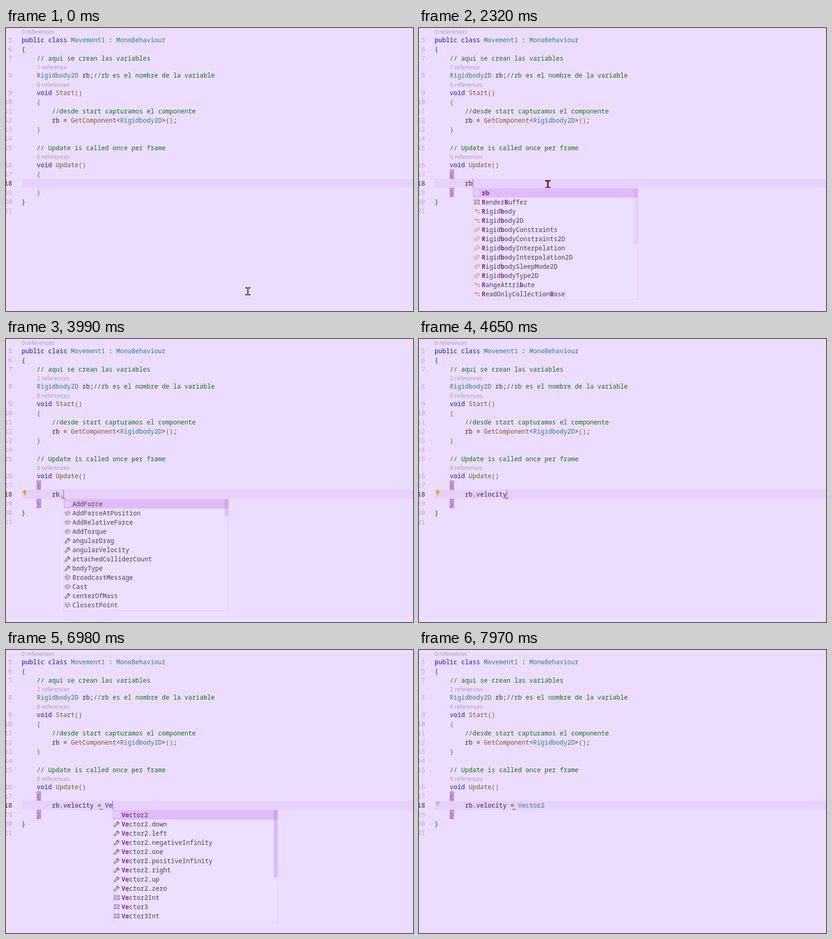
An HTML page with a canvas that plays this animation: 886x616 px, repeating every 8 s.

```html
<!DOCTYPE html>
<html lang="es">
<head>
<meta charset="utf-8">
<title>Code editor</title>
<style>
html, body { margin: 0; width: 100%; height: 100%; overflow: hidden; background: #ecddff; }
canvas { display: block; }
</style>
</head>
<body>
<canvas id="stage" width="886" height="616"></canvas>
<script>
const ctx = document.getElementById('stage').getContext('2d');
const LOOP = 8000, LEFT = 34, CHAR = 8.247;
const MONO = '13.745px "Noto Sans Mono", "DejaVu Sans Mono", monospace';
const LENS = '12.3px "Open Sans", "Noto Sans", sans-serif';
const GRAY = '#6a5a78', TAN = '#d49a66', WHITE = '#f8f0ff', PURPLE = '#8a4fb0';

// [line number, top, text]
const LINES = [
  [5, 16, 'public class Movement1 : MonoBehaviour'],
  [6, 36, '{'],
  [7, 56, '    // aqui se crean las variables'],
  [8, 93, '    Rigidbody2D rb;//rb es el nombre de la variable'],
  [9, 131, '    void Start()'],
  [10, 151, '    {'],
  [11, 171, '        //desde start capturamos el componente'],
  [12, 191, '        rb = GetComponent<Rigidbody2D>();'],
  [13, 211, '    }'],
  [14, 231, ''],
  [15, 251, '    // Update is called once per frame'],
  [16, 288, '    void Update()'],
  [17, 308, '    {'],
  [18, 328, ''],
  [19, 348, '    }'],
  [20, 368, '}'],
  [21, 388, '']
];

// Suggestion lists: the leading letter names the icon.
const VECTORS = ('s:Vector2 p:Vector2.down p:Vector2.left p:Vector2.negativeInfinity p:Vector2.one ' +
  'p:Vector2.positiveInfinity p:Vector2.right p:Vector2.up p:Vector2.zero s:Vector2Int s:Vector3 s:Vector3Int').split(' ');
const POPUPS = {
  rb: { match: /(^r|b)/i, bar: 121, alpha: .11, items: ('f:rb s:RenderBuffer c:Rigidbody c:Rigidbody2D ' +
    'e:RigidbodyConstraints e:RigidbodyConstraints2D e:RigidbodyInterpolation e:RigidbodyInterpolation2D ' +
    'e:RigidbodySleepMode2D e:RigidbodyType2D c:RangeAttribute c:ReadOnlyCollectionBase').split(' ') },
  members: { match: /(^$)/, bar: 36, alpha: .2, items: ('m:AddForce m:AddForceAtPosition m:AddRelativeForce ' +
    'm:AddTorque p:angularDrag p:angularVelocity p:attachedColliderCount p:bodyType m:BroadcastMessage ' +
    'm:Cast p:centerOfMass m:ClosestPoint').split(' ') },
  velocity: { match: /(^ve|Ve)/, bar: 0, alpha: 0, items: ('p:velocity p:angularVelocity m:GetPointVelocity ' +
    'm:GetRelativePointVelocity m:GetRelativeVector m:GetVector').split(' ') },
  ve: { match: /(^Ve)/, bar: 146, alpha: .25, items: VECTORS },
  vec: { match: /(^Vec)/, bar: 146, alpha: .25, items: VECTORS }
};

// [time, typed text, caret column, squiggle centre column, suggestion list]; -1 hides
const STEPS = [
  [0, '', -1, -1],
  [990, '', 0, -1],
  [1320, '', -1, -1],
  [1650, '', 8, -1],
  [1980, '', -1, -1],
  [2320, 'rb', 10, -1, 'rb'],
  [2980, 'rb', -1, -1, 'rb'],
  [3330, 'rb', 10, 10, 'rb'],
  [3990, 'rb.', 11, 11, 'members'],
  [4320, 'rb.ve', 13, 13, 'velocity'],
  [4650, 'rb.velocity', 19, 19],
  [5320, 'rb.velocity ', 20, 20],
  [5650, 'rb.velocity = ', 22, 22],
  [6320, 'rb.velocity = ', -1, 22],
  [6650, 'rb.velocity = ', 22, 21],
  [6980, 'rb.velocity = Ve', 24, 21, 've'],
  [7310, 'rb.velocity = Vec', 25, 21, 'vec'],
  [7640, 'rb.velocity = Vector2', 29, 21],
  [7970, 'rb.velocity = Vector2', -1, 21]
];

// [time, x, y] of the pointer's centre
const POINTER = [[0, 526, 573], [330, 328, 353], [660, 280, 340]];

const latest = (list, t) => list.filter(s => s[0] <= t).pop();
const colX = col => LEFT + col * CHAR;
const caretX = col => Math.round(colX(col) + .3);

function rect(x, y, w, h, color) {
  ctx.fillStyle = color;
  ctx.fillRect(x, y, w, h);
}

function frame(x, y, w, h, color) {
  ctx.strokeStyle = color;
  ctx.lineWidth = 1;
  ctx.strokeRect(x + .5, y + .5, w - 1, h - 1);
}

function path(points, color, width = 1) {
  ctx.strokeStyle = color;
  ctx.lineWidth = width;
  ctx.beginPath();
  points.forEach(([x, y]) => ctx.lineTo(x, y));
  ctx.stroke();
}

function disc(x, y, r, color) {
  ctx.fillStyle = color;
  ctx.beginPath();
  ctx.arc(x, y, r, 0, 7);
  ctx.fill();
}

// Places every character on the column grid.
function mono(text, x, y, color, bold) {
  ctx.font = (bold ? 'bold ' : '') + MONO;
  ctx.fillStyle = color;
  [...text].forEach((c, i) => c !== ' ' && ctx.fillText(c, x + i * CHAR, y));
}

function tokenColor(word, col, t) {
  if (word.startsWith('//')) return '#0c7712';
  if (/^(public|class|void)$/.test(word)) return '#0a14e6';
  if (/^(Movement1|MonoBehaviour|Rigidbody2D)$/.test(word)) return '#267f99';
  if (word === 'Vector2' && t >= 7970) return '#267f99';
  if (/^(Start|Update|GetComponent)$/.test(word)) return '#795e26';
  if (/[{}]/.test(word)) return col ? '#69713c' : '#0431fa';
  if (/[()]/.test(word)) return '#6b6639';
  return /\w/.test(word) ? '#35206f' : '#30254a';
}

function code(text, top, t) {
  for (const m of text.matchAll(/\/\/.*|\w+|\S/g))
    mono(m[0], colX(m.index), top + 15, tokenColor(m[0], m.index, t));
}

function lens(text, x, y) {
  ctx.font = LENS;
  ctx.fillStyle = '#a795b7';
  ctx.fillText(text, x, y);
}

function cube(x, y, color) {
  path([[x - 5, y - 2], [x + 1, y - 5], [x + 5, y - 2], [x + 5, y + 2], [x - 1, y + 5], [x - 5, y + 2], [x - 5, y - 2], [x - 1, y], [x + 5, y - 2]], color);
  path([[x - 1, y], [x - 1, y + 5]], color);
}

// Each icon has its usual colour and a shape.
const ICONS = {
  f: [PURPLE, cube],
  m: [PURPLE, cube],
  s: [GRAY, (x, y, color) => {
    frame(x - 6, y - 5, 12, 4, color);
    frame(x - 6, y + 1, 5, 4, color);
    frame(x + 1, y + 1, 5, 4, color);
  }],
  c: [TAN, (x, y, color) => {
    path([[x - 5, y - 2], [x - 2, y - 5], [x, y - 3], [x - 3, y], [x - 5, y - 2]], color, 1.3);
    path([[x - 1, y - 1.5], [x + 4, y - 1.5]], color);
    path([[x + .5, y - 1], [x + .5, y + 3.5], [x + 4, y + 3.5]], color);
    frame(x + 3, y - 3, 3, 3, color);
    frame(x + 3, y + 2, 3, 3, color);
  }],
  e: [TAN, (x, y, color) => {
    path([[x - .5, y - 1], [x - .5, y - 4.5], [x + 5.5, y - 4.5], [x + 5.5, y + .5], [x + 2, y + .5]], color, 1.2);
    frame(x - 6, y - 1, 7, 6, color);
    path([[x + 1, y - 2.5], [x + 4, y - 2.5]], color);
    path([[x - 4, y + 1.5], [x - 1, y + 1.5]], color);
  }],
  p: [GRAY, (x, y, color) => {
    path([[x + 4, y - 5], [x + 1, y - 5], [x - 1, y - 3], [x - 1, y - 1], [x - 6, y + 4], [x - 4, y + 6], [x + 1, y + 1], [x + 3, y + 1], [x + 5, y - 1], [x + 5, y - 3], [x + 3, y - 1.5], [x + 1, y - 3], [x + 4, y - 5]], color, 1.1);
  }]
};

function popup({ match, bar, alpha, items }, left) {
  const top = 349, height = items.length * 20;
  rect(left, top - 1, 360, height + 3, '#ecdfff');
  rect(left + 1, top, 358, 20, '#e0bbf9');
  frame(left, top - 1, 360, height + 4, '#e2cbf5');
  items.forEach((item, i) => {
    const y = top + 20 * i;
    const [color, shape] = ICONS[item[0]];
    let x = left + 19.5;
    shape(left + 9, y + 10, i ? color : WHITE);
    item.slice(2).split(match).forEach((part, k) => {
      mono(part, x, y + 15, k % 2 ? '#8020be' : '#4d3d60', k % 2);
      x += part.length * CHAR;
    });
  });
  rect(left + 351, top, 8, bar, `rgba(170, 80, 225, ${alpha})`);
}

function bulb(color) {
  disc(40.7, 332.8, 3.8, color);
  rect(39, 336, 3.5, 4, color);
}

function pointer(x, y, clicked) {
  const edge = clicked ? '#16091a' : '#174a1b';
  const fill = clicked ? '#dd1c9c' : '#8fc08e';
  const stem = clicked ? '#dd1c9c' : '#c98a96';
  for (const side of [x - 5, x + 1]) {
    rect(side, y - 9, 5, 3, edge);
    rect(side, y + 6, 5, 3, edge);
  }
  rect(x - 1, y - 8, 3, 16, edge);
  rect(x - 4, y - 8, 9, 1, fill);
  rect(x - 4, y + 7, 9, 1, fill);
  rect(x, y - 7, 1, 14, stem);
}

function draw(t) {
  const [, typed, caret, squiggle, list] = latest(STEPS, t);
  rect(0, 0, 886, 616, '#ecddff');
  rect(LEFT, 328, 852, 20, '#e6d1fa');

  if (t >= 990) for (const y of [308, 348]) {
    rect(67, y, 9, 20, '#cf9cf0');
    frame(67, y, 9, 20, '#b263dd');
  }

  lens('0 references', 34, 13);
  lens(t < 2980 ? '1 reference' : '2 references', 67.5, 90);
  lens('0 references', 67.5, 128);
  lens('0 references', 67.5, 285);
  for (const [n, top, text] of LINES) {
    const label = String(n);
    mono(label, 13.3 - label.length * CHAR, top + 15, n === 18 ? '#251c46' : '#bda6cc');
    code(text, top, t);
  }
  code(' '.repeat(8) + typed, 328, t);

  if (t >= 2650 && t < 5650) bulb('#e0ad08');
  if (t >= 7640) bulb('#d0afa6');
  if (squiggle >= 0) {
    const x = Math.round(colX(squiggle));
    path([[x - 4, 347.5], [x - 1, 345.8], [x + 1, 347.5], [x + 4, 347]], '#43204f');
  }
  if (t < 2980) {
    const [, x, y] = latest(POINTER, t);
    pointer(x, y, t >= 990);
  }
  if (list) popup(POPUPS[list], caretX(8 + typed.length));
  if (caret >= 0) rect(caretX(caret), 328, 1, 20, '#a83acb');
}

function tick() {
  draw(performance.now() % LOOP);
  requestAnimationFrame(tick);
}
tick();
</script>
</body>
</html>
```
